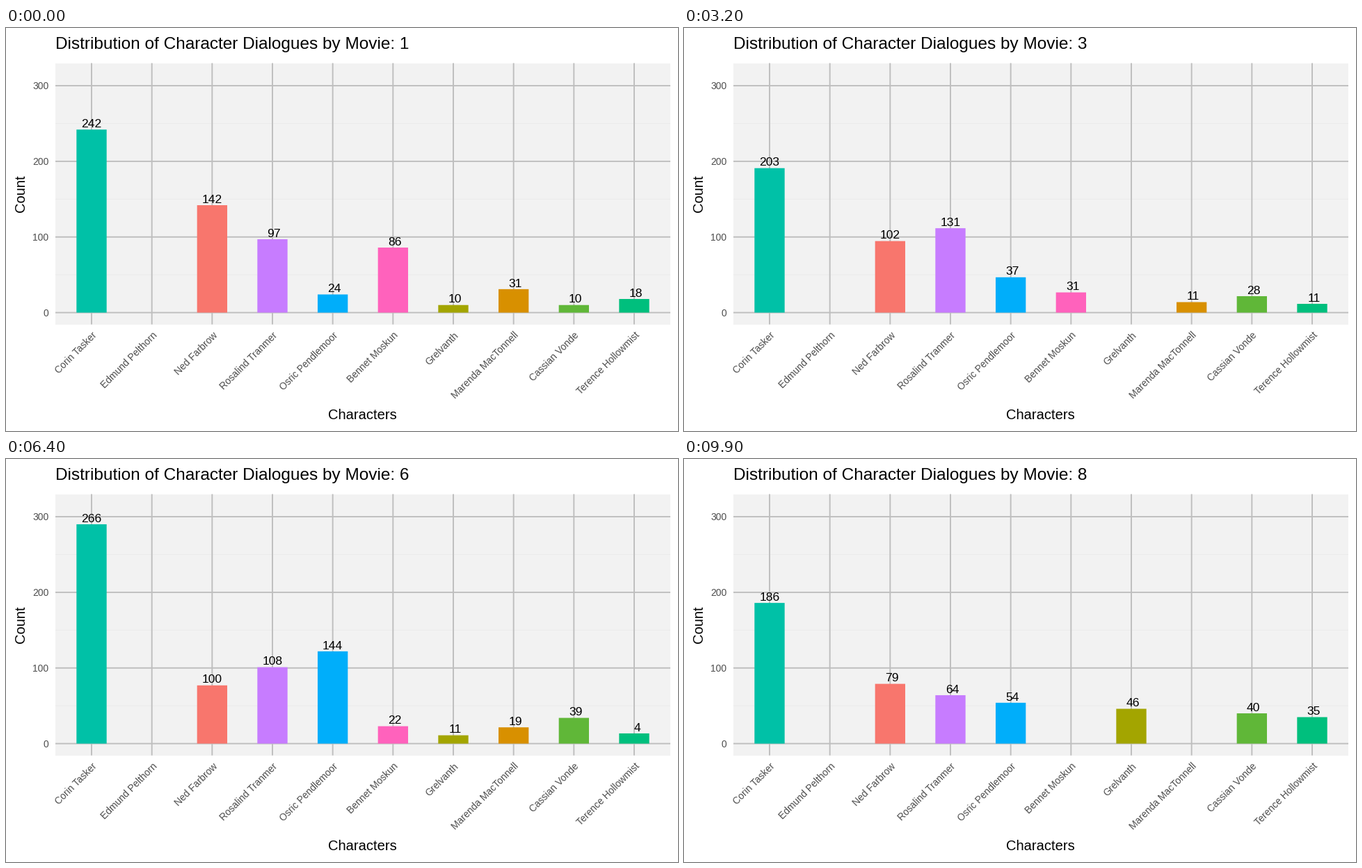
Animation of 966 by 580 pixels, one loop 10000 ms. Source, as a matplotlib script:

```python
import numpy as np
import matplotlib.pyplot as plt
from matplotlib.animation import FuncAnimation
from matplotlib.patches import Rectangle

W, H, DPI = 966, 580, 100
FRAMES, INTERVAL = 100, 100
PX = 72 / DPI  # points per pixel

LEFT, RIGHT, TOP, BOTTOM = 71, 955, 50.5, 426.6
STEP = (RIGHT - LEFT) / 10.2
BAR = STEP / 2
ZERO, UNIT = 409.6, 1.0885

# name, colour, lines spoken in each of the eight movies (0 = absent)
CAST = [
    ("Corin Tasker", "#00C1A7", (242, 268, 203, 161, 314, 266, 282, 186)),
    ("Edmund Pelthorn", "#9590FF", (0, 0, 0, 0, 0, 128, 0, 0)),
    ("Ned Farbrow", "#F8766D", (142, 146, 102, 76, 54, 100, 167, 79)),
    ("Rosalind Tranmer", "#C77CFF", (97, 70, 131, 63, 94, 108, 221, 64)),
    ("Osric Pendlemoor", "#00AEFA", (24, 45, 37, 71, 100, 144, 0, 54)),
    ("Bennet Moskun", "#FF62BC", (86, 38, 31, 16, 24, 22, 11, 0)),
    ("Grelvanth", "#A3A500", (10, 0, 0, 23, 11, 0, 20, 46)),
    ("Marenda MacTonnell", "#D89000", (31, 24, 11, 21, 24, 19, 0, 0)),
    ("Cassian Vonde", "#60B738", (10, 12, 28, 6, 29, 39, 4, 40)),
    ("Terence Hollowmist", "#00BF7D", (18, 7, 11, 13, 23, 4, 1, 35)),
]
MOVIES = 8
KEYS = np.rint(np.linspace(0, FRAMES - 1, MOVIES)).astype(int)

LABEL_SIZE = 17.5
SPACE = 0.278 * LABEL_SIZE

plt.rcParams["font.family"] = "Liberation Sans"
fig = plt.figure(figsize=(W / DPI, H / DPI), dpi=DPI, facecolor="white")
ax = fig.add_axes([0, 0, 1, 1])
ax.set_xlim(0, W)
ax.set_ylim(H, 0)
ax.axis("off")


def y_at(count):
    return ZERO - UNIT * count


def x_at(i):
    return LEFT + (0.6 + i) * STEP


def line(xs, ys, color, width):
    ax.plot(xs, ys, color=color, lw=width * PX, solid_capstyle="butt",
            snap=False, zorder=1)


def text(x, y, s, size, color="black", ha="center", **kw):
    return ax.text(x, y, s, fontsize=size * PX, color=color, ha=ha,
                   va="baseline", rotation_mode="anchor", zorder=3, **kw)


ax.add_patch(Rectangle((LEFT, TOP), RIGHT - LEFT, BOTTOM - TOP,
                       fc="#F2F2F2", lw=0, zorder=0))
for v in (50, 150, 250):
    line([LEFT, RIGHT], [y_at(v)] * 2, "#EBEBEB", 1)
for v in (0, 100, 200, 300):
    line([LEFT, RIGHT], [y_at(v)] * 2, "#BEBEBE", 1.9)
    text(61.5, y_at(v) + 5, str(v), 13.9, "#4D4D4D", ha="right")

bars, labels = [], []
for i, (name, color, _) in enumerate(CAST):
    x = x_at(i)
    line([x, x], [TOP, BOTTOM], "#BEBEBE", 1.9)
    text(x + 8.2, 442.7, name, 13.9, "#4D4D4D", ha="right", rotation=45)
    bar = Rectangle((x - BAR / 2, ZERO), BAR, 0, fc=color, lw=0,
                    snap=False, zorder=2)
    bars.append(ax.add_patch(bar))
    labels.append(text(x, ZERO, "", LABEL_SIZE))

title = text(71, 29.6, "", 24.4, ha="left")
text(512.7, 563.4, "Characters", 20.1)
text(26.6, 238.5, "Count", 20.1, rotation=90)


def update(frame):
    a = int(np.searchsorted(KEYS, frame, side="right")) - 1
    b = min(a + 1, MOVIES - 1)
    t = (frame - KEYS[a]) / max(KEYS[b] - KEYS[a], 1)
    near = b if t >= 0.5 else a
    title.set_text(f"Distribution of Character Dialogues by Movie: {near + 1}")

    for i, (_, _, counts) in enumerate(CAST):
        # newcomers wait for their movie, leavers hold until the next one
        start, end = counts[a], counts[b] or counts[a]
        shown = start > 0
        bars[i].set_visible(shown)
        labels[i].set_visible(shown)
        if not shown:
            continue
        value = start + (end - start) * t
        bars[i].set_height(-UNIT * value)
        s = str(counts[near] or start)
        labels[i].set_text(s)
        # numbers are right-aligned to three characters, then centred
        labels[i].set_position((x_at(i) + (3 - len(s)) * SPACE / 2,
                                y_at(value) - 3.3))
    return [*bars, *labels, title]


anim = FuncAnimation(fig, update, frames=FRAMES, interval=INTERVAL,
                     repeat=True, repeat_delay=0, blit=False)
plt.show()
```
